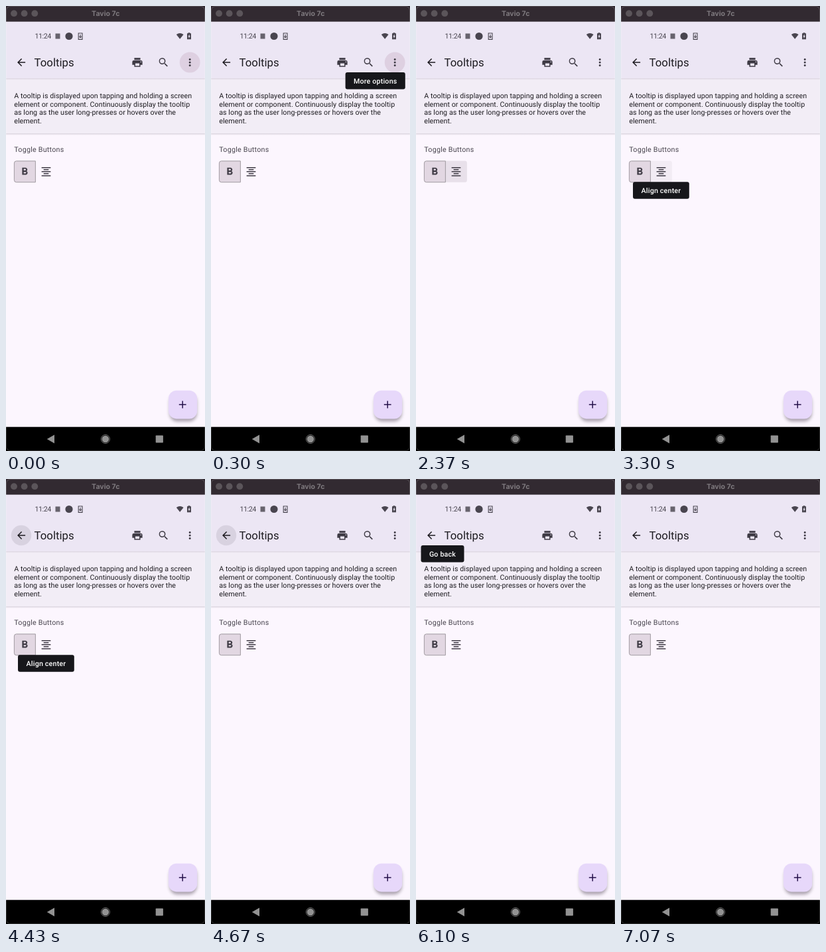
An HTML page for the animation above (7.41 s loop, 300 by 671 pixels).

```html
<!DOCTYPE html>
<html lang="en">
<head>
<meta charset="utf-8">
<title>Tooltips</title>
<style>
  html, body { margin: 0; width: 100%; height: 100%; overflow: hidden; background: #000; }
  svg { display: block; width: 100vw; height: 100vh; font-family: Roboto, sans-serif; text-rendering: geometricPrecision; }
  .tip rect { fill: #17171b; }
  .tip text { fill: #fff; font-size: 10.7px; font-weight: 500; letter-spacing: .17px; text-anchor: middle; }
  .body { font-size: 10.69px; letter-spacing: .06px; fill: #1f1d22; }
</style>
</head>
<body>
<svg viewBox="0 0 300 671" xmlns="http://www.w3.org/2000/svg">
  <defs>
    <linearGradient id="edge" x2="0" y2="1">
      <stop offset="0" stop-color="#d9d2dd"/>
      <stop offset="1" stop-color="#d9d2dd" stop-opacity="0"/>
    </linearGradient>
    <filter id="blur" x="-30%" y="-30%" width="160%" height="160%">
      <feGaussianBlur stdDeviation="2.5"/>
    </filter>
    <clipPath id="alignClip"><path d="M44.8 233.6H73.5a3.4 3.4 0 0 1 3.4 3.4V262.4a3.4 3.4 0 0 1-3.4 3.4H44.8Z"/></clipPath>
  </defs>

  <rect width="300" height="671" fill="#fcf6fe"/>

  <!-- description card -->
  <rect y="110" width="300" height="82" fill="#f2edf6"/>
  <rect y="192" width="300" height="3" fill="url(#edge)"/>
  <g class="body">
    <text x="12.2" y="139">A tooltip is displayed upon tapping and holding a screen</text>
    <text x="12.2" y="151.7">element or component. Continuously display the tooltip</text>
    <text x="12.2" y="164.4">as long as the user long-presses or hovers over the</text>
    <text x="12.2" y="177.1">element.</text>
  </g>

  <!-- app bar -->
  <rect y="22" width="300" height="87" fill="#ece6f4"/>
  <rect y="109" width="300" height="2.5" fill="url(#edge)"/>
  <circle id="moreRipple" cx="277.2" cy="85" fill="#803c66"/>
  <circle id="backRipple" cx="23" cy="85" fill="#49454f"/>
  <text x="42.6" y="91" font-size="16.8" fill="#1d1b20">Tooltips</text>

  <!-- status bar -->
  <g fill="#49454f">
    <text x="43.6" y="49.4" font-size="10.7" letter-spacing="-.5">11:24</text>
    <rect x="74.5" y="41.5" width="7" height="8" fill="#67636d"/>
    <circle cx="95" cy="45.5" r="5.6"/>
    <path d="M109.2 41h5.8v9.4h-5.8zM112.1 43v4.6m-1.8-1.8 1.8 1.8 1.8-1.8" fill="none" stroke="#49454f" stroke-width="1.1"/>
    <path d="M256.8 43q5.4-4 10.8 0l-5.4 6.8z"/>
    <path d="M274.6 40.2h2.8v1h1.6v9h-6v-9h1.6z"/>
    <path d="M276.6 42.8v2.4h1.2l-2.2 3.6v-2.6h-1.2z" fill="#ece6f4"/>
  </g>

  <!-- toggle buttons -->
  <text x="12.2" y="220" font-size="10.69" letter-spacing=".25" fill="#49454f">Toggle Buttons</text>
  <path d="M15.6 233.8H44.4V265.7H15.6a3.2 3.2 0 0 1-3.2-3.2V237a3.2 3.2 0 0 1 3.2-3.2Z" fill="#e2d7e2" stroke="#8d898f" stroke-width=".8"/>
  <g clip-path="url(#alignClip)"><circle id="alignRipple" cx="60.5" cy="249.8" fill="#5a4658"/></g>

  <g id="icons"></g>

  <!-- floating button -->
  <rect x="246.6" y="585" width="41" height="41.5" rx="12" fill="#3a2d40" opacity=".42" filter="url(#blur)"/>
  <rect x="245" y="579.7" width="43.2" height="42.8" rx="12.2" fill="#e7d8fa"/>
  <path d="M260.8 601h10.8m-5.4-5.4v10.8" stroke="#25104a" stroke-width="1.5" fill="none"/>

  <g id="tips"></g>

  <!-- window frame -->
  <rect width="300" height="23.6" fill="#322a31"/>
  <g fill="#5b555a">
    <circle cx="12" cy="11.2" r="4.9"/><circle cx="27.6" cy="11.2" r="4.9"/><circle cx="43.3" cy="11.2" r="4.9"/>
  </g>
  <text x="150.3" y="14.9" font-family="Inter, sans-serif" font-size="10.6" font-weight="700" fill="#7e797e" text-anchor="middle">Tavio 7c</text>
  <rect y="634.7" width="300" height="37" fill="#000"/>
  <g fill="#929292">
    <path d="M61.8 653 73 646.5v13z"/>
    <circle cx="149.9" cy="653" r="5.3"/>
    <circle cx="149.9" cy="653" r="6.5" fill="none" stroke="#929292" stroke-width=".8"/>
    <rect x="225.7" y="647.4" width="11.2" height="11.2" rx=".8"/>
  </g>
  <rect x=".5" y=".5" width="299" height="670" rx="6" fill="none" stroke="#fff" stroke-opacity=".18"/>
</svg>
<script>
const LOOP = 7410;
const NS = 'http://www.w3.org/2000/svg';
const $ = id => document.getElementById(id);
const clamp = v => Math.max(0, Math.min(1, v));

function add(parent, tag, attrs, text) {
  const el = document.createElementNS(NS, tag);
  for (const key in attrs) el.setAttribute(key, attrs[key]);
  if (text) el.textContent = text;
  return parent.appendChild(el);
}

// 24-unit icons: centre x, centre y, colour, path
const icons = [
  [23, 85, '#1d1b20', 'M20 11V13H8L13.5 18.5 12.08 19.92 4.16 12 12.08 4.08 13.5 5.5 8 11Z'],
  [198, 85, '#3f3b45', 'M18 3H6V7H18M19 12A1 1 0 0 1 19 10A1 1 0 0 1 19 12M16 19H8V14H16M19 8H5A3 3 0 0 0 2 11V17H6V21H18V17H22V11A3 3 0 0 0 19 8Z'],
  [237.4, 85, '#3f3b45', 'M9.5 3A6.5 6.5 0 0 1 16 9.5C16 11.11 15.41 12.59 14.44 13.73L14.71 14H15.5L20.5 19 19 20.5 14 15.5V14.71L13.73 14.44A6.5 6.5 0 1 1 9.5 3M9.5 5A4.5 4.5 0 1 0 9.5 14A4.5 4.5 0 1 0 9.5 5Z'],
  [277.2, 85, '#3f3b45', [6, 12, 18].map(y => `M10 ${y}a2 2 0 0 1 4 0a2 2 0 0 1-4 0Z`).join('')],
  [28.2, 249.8, '#3f3b45', 'M13.5 15.5H10V12.5H13.5A1.5 1.5 0 0 1 13.5 15.5M10 6.5H13A1.5 1.5 0 0 1 13 9.5H10M15.6 10.79C16.57 10.11 17.25 9 17.25 8 17.25 5.74 15.5 4 13.25 4H7V18H14.04C16.14 18 17.75 16.3 17.75 14.21 17.75 12.69 16.89 11.39 15.6 10.79Z'],
  [60.5, 249.8, '#3f3b45', 'M3 3H21V5H3ZM7 7H17V9H7ZM3 11H21V13H3ZM7 15H17V17H7ZM3 19H21V21H3Z']
];
for (const [x, y, fill, d] of icons) {
  add($('icons'), 'path', {
    d, fill, 'fill-rule': 'evenodd',
    transform: `translate(${x} ${y}) scale(.763) translate(-12 -12)`
  });
}

const tips = [
  { label: 'More options', x: 202.6, y: 100, w: 90.2, show: 100, hide: 2170 },
  { label: 'Align center', x: 18, y: 265.3, w: 84.8, show: 2600, hide: 4670 },
  { label: 'Go back', x: 7.5, y: 100, w: 65, show: 4700, hide: 6770 }
];
for (const tip of tips) {
  tip.el = add($('tips'), 'g', { class: 'tip' });
  add(tip.el, 'rect', { x: tip.x, y: tip.y, width: tip.w, height: 25.4, rx: 3 });
  add(tip.el, 'text', { x: tip.x + tip.w / 2, y: tip.y + 17 }, tip.label);
}

const ripples = [
  { el: $('moreRipple'), r: 15.4, alpha: .13, press: -400, release: 670 },
  { el: $('alignRipple'), r: 24, alpha: .12, press: 2170, release: 3170 },
  { el: $('backRipple'), r: 15.2, alpha: .12, press: 4240, release: 5270 }
];

function draw(t) {
  for (const { el, show, hide } of tips) {
    el.setAttribute('visibility', t >= show && t < hide ? 'visible' : 'hidden');
  }
  for (const { el, r, alpha, press, release } of ripples) {
    const grow = 1 - (1 - clamp((t - press) / 200)) ** 2;
    const fade = clamp((t - press) / 90) * (1 - clamp((t - release) / 250));
    el.setAttribute('r', r * (.5 + .5 * grow));
    el.setAttribute('opacity', alpha * fade);
  }
}

const start = performance.now();
function tick() {
  draw((performance.now() - start) % LOOP);
  requestAnimationFrame(tick);
}
draw(0);
requestAnimationFrame(tick);
</script>
</body>
</html>
```
